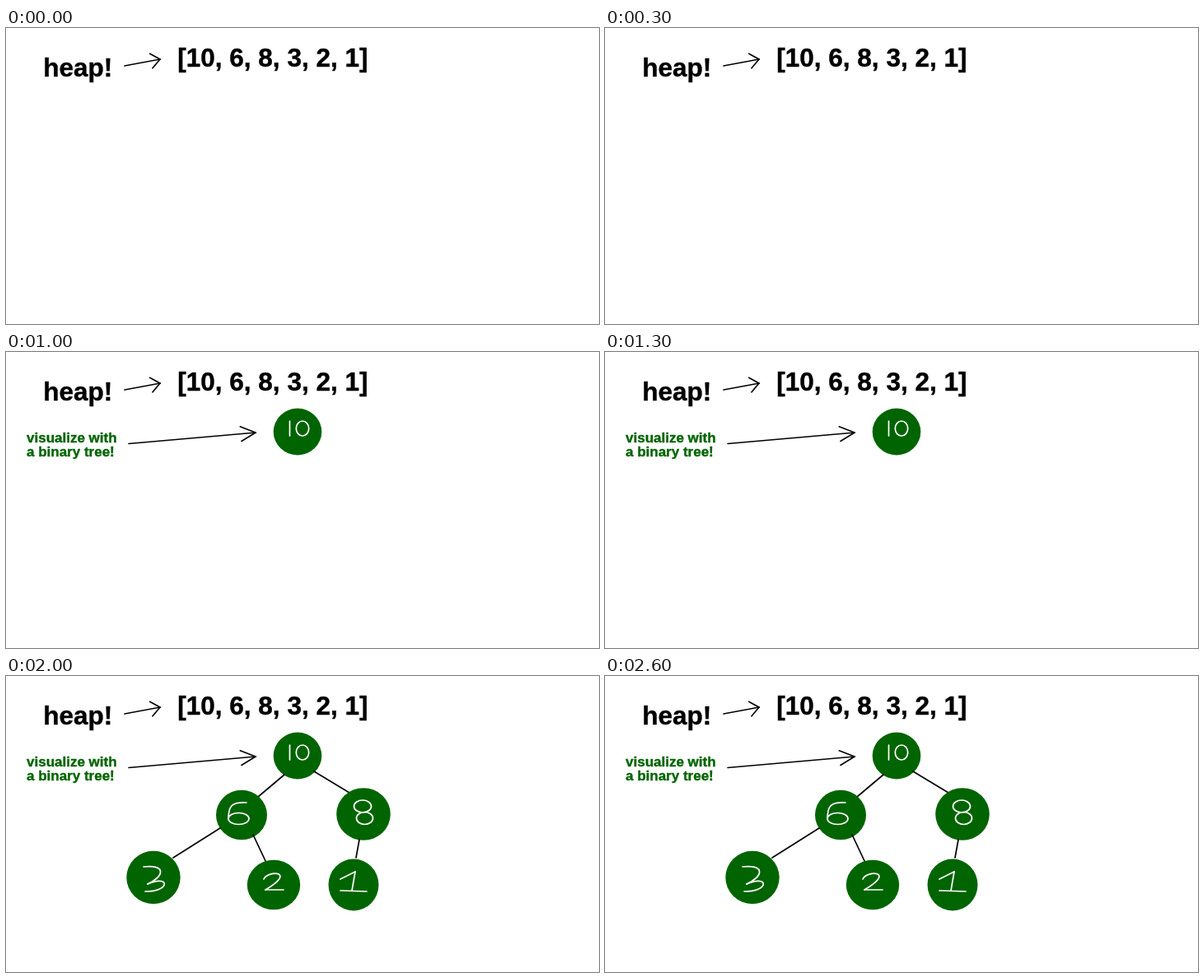
An HTML page with a canvas for the animation above (3000 ms loop, 720x360 px).

```html
<!DOCTYPE html>
<html lang="en">
<head>
<meta charset="utf-8">
<title>Heap as a binary tree</title>
<style>
  html, body { margin: 0; width: 100%; height: 100%; overflow: hidden; background: #fff; }
  canvas { display: block; }
</style>
</head>
<body>
<canvas id="stage" width="720" height="360"></canvas>
<script>
const ctx = document.getElementById('stage').getContext('2d');
const GREEN = '#006400';
const STEP = 500;
const LOOP = 3000;

function text(str, x, y, size, color) {
  ctx.font = `bold ${size}px "Liberation Sans", Arial, sans-serif`;
  ctx.fillStyle = ctx.strokeStyle = color;
  ctx.lineWidth = 0.4;
  ctx.fillText(str, x, y);
  ctx.strokeText(str, x, y);
}

function trace(color, build) {
  ctx.strokeStyle = color;
  ctx.lineWidth = 1.7;
  ctx.beginPath();
  build();
  ctx.stroke();
}

function line(color, x1, y1, x2, y2) {
  trace(color, () => {
    ctx.moveTo(x1, y1);
    ctx.lineTo(x2, y2);
  });
}

const edge = (...ends) => line('#000', ...ends);
const pen = (...ends) => line('#fff', ...ends);

function ring(x, y, rx, ry) {
  trace('#fff', () => ctx.ellipse(x, y, rx, ry, 0, 0, Math.PI * 2));
}

function swoop(x1, y1, cx1, cy1, cx2, cy2, x2, y2) {
  trace('#fff', () => {
    ctx.moveTo(x1, y1);
    ctx.bezierCurveTo(cx1, cy1, cx2, cy2, x2, y2);
  });
}

function arrow(x1, y1, x2, y2, size, spread) {
  edge(x1, y1, x2, y2);
  const back = Math.atan2(y1 - y2, x1 - x2);
  for (const a of [back - spread, back + spread]) {
    edge(x2, y2, x2 + size * Math.cos(a), y2 + size * Math.sin(a));
  }
}

function node(x, y, rx, ry) {
  ctx.fillStyle = GREEN;
  ctx.beginPath();
  ctx.ellipse(x, y, rx, ry, 0, 0, Math.PI * 2);
  ctx.fill();
}

function heading() {
  text('heap!', 45.3, 59, 31.5, '#000');
  text('[10, 6, 8, 3, 2, 1]', 208.3, 47, 31.5, '#000');
  arrow(144, 46, 187, 38, 14, 0.69);
}

function caption() {
  text('visualize with', 25, 110, 17, GREEN);
  text('a binary tree!', 25, 127, 17, GREEN);
}

function root() {
  arrow(149, 111.5, 303, 98, 20, 0.46);
  node(354, 97, 29.3, 28.4);
  pen(344.5, 84, 344.5, 102);
  ring(360, 93, 7.7, 9);
}

function children() {
  edge(338, 120, 306, 147);
  edge(374, 116, 417, 142);
  node(286, 169, 31, 30.2);
  node(434, 168, 32.8, 31.8);
  swoop(292, 154, 274, 153, 270, 158, 270, 174);
  ring(282.5, 173.5, 12.5, 7);
  ring(433, 158.5, 10.5, 7.5);
  ring(435.5, 173, 10, 7.5);
}

function leaves() {
  edge(260, 185, 203, 221);
  edge(300, 193, 316, 227);
  edge(429, 199, 425, 221);
  node(179, 245, 32.7, 32.2);
  node(325, 254, 32.2, 30.2);
  node(422, 254, 30.5, 31.5);
  swoop(167, 232, 194, 229, 193, 243, 172, 253);
  swoop(172, 253, 198, 241, 201, 262, 169, 262);
  swoop(313, 247, 318, 236, 354, 237, 315, 260);
  pen(315, 260, 337, 260);
  pen(406, 247, 424, 238);
  pen(424, 238, 420, 261);
  pen(406, 261, 438, 262);
}

const scenes = [heading, caption, root, children, leaves];

function draw(now) {
  const t = now % LOOP;
  ctx.fillStyle = '#fff';
  ctx.fillRect(0, 0, 720, 360);
  ctx.lineCap = ctx.lineJoin = 'round';
  scenes.forEach((paint, i) => { if (t >= i * STEP) paint(); });
}

const start = performance.now();
function tick() {
  draw(performance.now() - start);
  requestAnimationFrame(tick);
}
tick();
</script>
</body>
</html>
```
